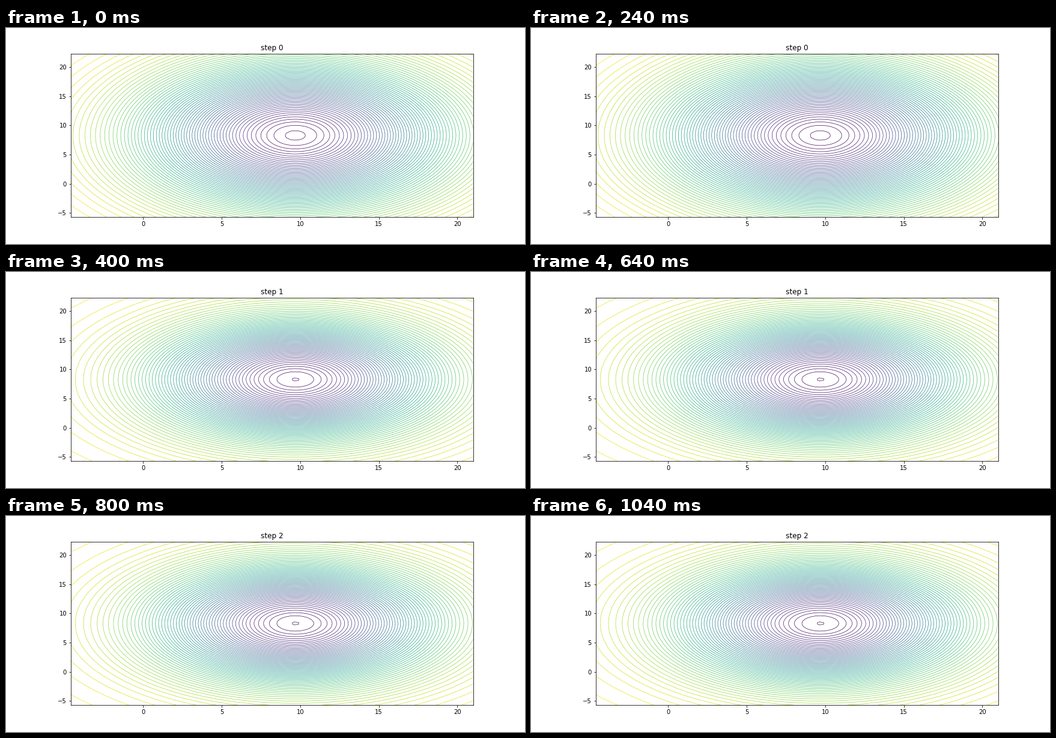
These frames come from a looping animation (864x360 px, 1200 ms). A matplotlib script:

```python
import numpy as np
import matplotlib.pyplot as plt
from matplotlib.animation import FuncAnimation

plt.rcParams["font.family"] = "DejaVu Sans"
plt.rcParams["font.size"] = 10

XLIM, YLIM = (-4.60, 21.006), (-5.695, 22.262)
MEAN = (9.689, 8.29)
# Spread in x and y, and peak height in contour steps, after each fit
FITS = [(6.883, 8.72, 66.295), (6.283, 7.031, 60.05), (6.283, 7.031, 60.05)]

X, Y = np.meshgrid(np.linspace(*XLIM, 100), np.linspace(*YLIM, 100))

fig, ax = plt.subplots(figsize=(12, 5), dpi=72)
fig.subplots_adjust(left=0.125, right=0.9, bottom=0.125, top=0.88)


def neg_density(sx, sy, peak):
    u = ((X - MEAN[0]) / sx) ** 2 + ((Y - MEAN[1]) / sy) ** 2
    return -peak * np.exp(-u / 2)


def draw(step):
    ax.clear()
    z = neg_density(*FITS[step])
    # One level beyond each end of the data sets the colour range
    levels = np.arange(np.floor(z.min()), np.ceil(z.max()) + 1)
    ax.contour(X, Y, z, levels=levels, cmap="viridis", linewidths=0.7)
    ax.set_xlim(*XLIM)
    ax.set_ylim(*YLIM)
    ax.set_title(f"step {step}")
    return []


anim = FuncAnimation(fig, draw, frames=len(FITS), interval=400,
                     init_func=lambda: draw(0), repeat=True, repeat_delay=0)
plt.show()
```
